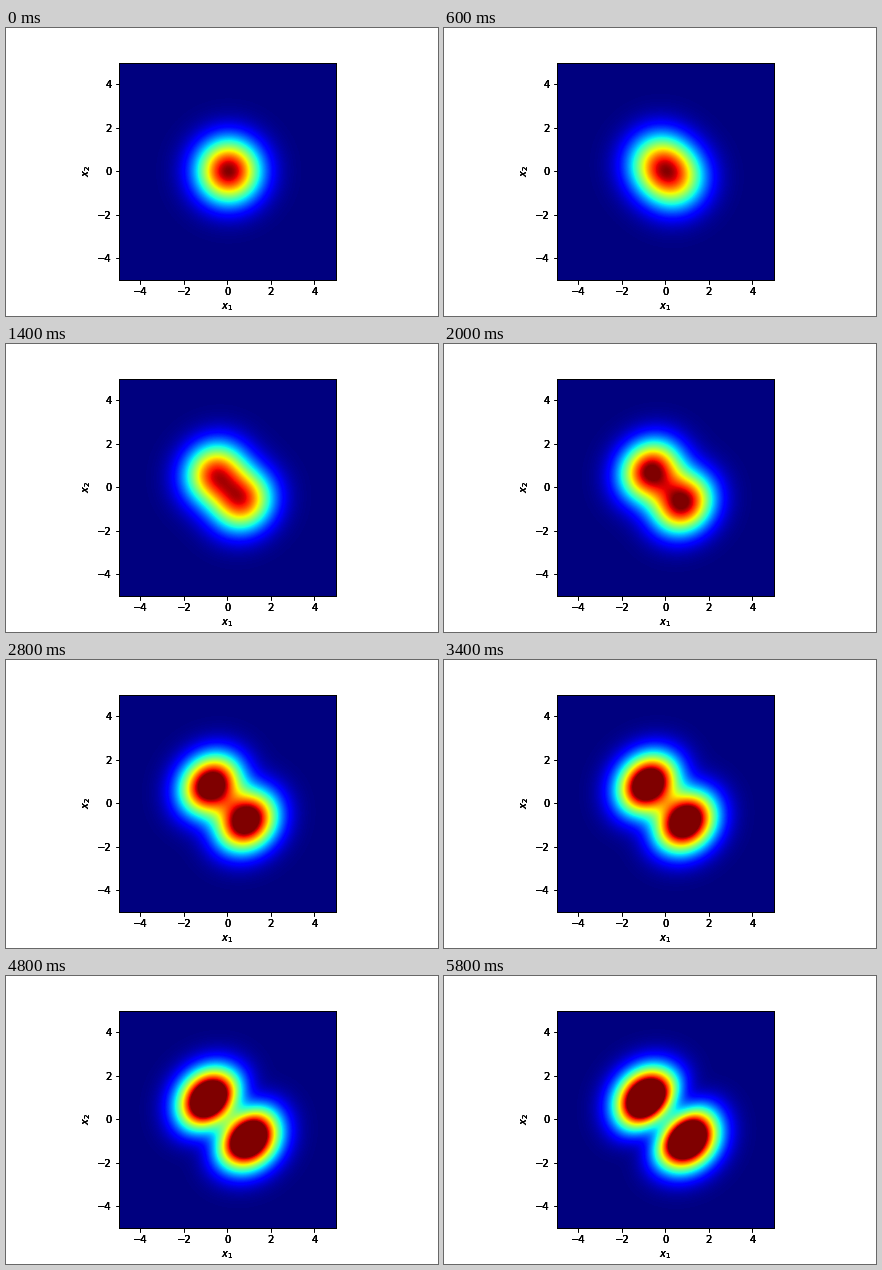
Write a matplotlib script that moves like this. It is 432 by 288 pixels and loops after 6 s.

```python
import numpy as np
import matplotlib.pyplot as plt
from matplotlib.animation import FuncAnimation

plt.rcParams.update({"font.family": "DejaVu Sans", "font.size": 10})

FRAMES, STEP = 30, 200
HALF = 5
GRID = 300
LAYERS = 4  # stacked axes give the heavy, hard-edged lettering

edge = HALF - HALF / GRID
axis = np.linspace(-edge, edge, GRID)
x1, x2 = np.meshgrid(axis - 0.03, axis)
u = (x1 - x2) / np.sqrt(2)  # relative coordinate
envelope = np.exp(-(x1**2 + x2**2) / 2)


def density(t):
    """Gaussian at t = 0 s that splits into two lobes along x1 = -x2."""
    core = 1 / (1 + (t / 5.3) ** 2.5)
    s = (t / 3.6) ** 1.6
    lobes = 2.9 * s / (1 + s)
    return (core + lobes * u**2) * envelope


fig = plt.figure(figsize=(6, 4), dpi=72, facecolor="white")


def add_axes(zorder):
    ax = fig.add_axes([0.125, 0.125, 0.775, 0.755], zorder=zorder)
    ax.set(xlim=(-HALF, HALF), ylim=(-HALF, HALF), aspect="equal")
    ax.set_xticks(range(-4, 5, 2))
    ax.set_yticks(range(-4, 5, 2))
    ax.set_xlabel("$x_1$")
    ax.set_ylabel("$x_2$")
    ax.patch.set_visible(False)
    return ax


layers = [add_axes(z) for z in range(LAYERS)]
image = layers[0].imshow(
    density(0), cmap="jet", vmin=0, vmax=1, origin="lower",
    extent=(-HALF, HALF, -HALF, HALF), interpolation="bilinear",
)


def update(i):
    image.set_data(density(i * STEP / 1000))
    return [image]


anim = FuncAnimation(fig, update, frames=FRAMES, interval=STEP,
                     repeat=True, repeat_delay=0, blit=False)
plt.show()
```
